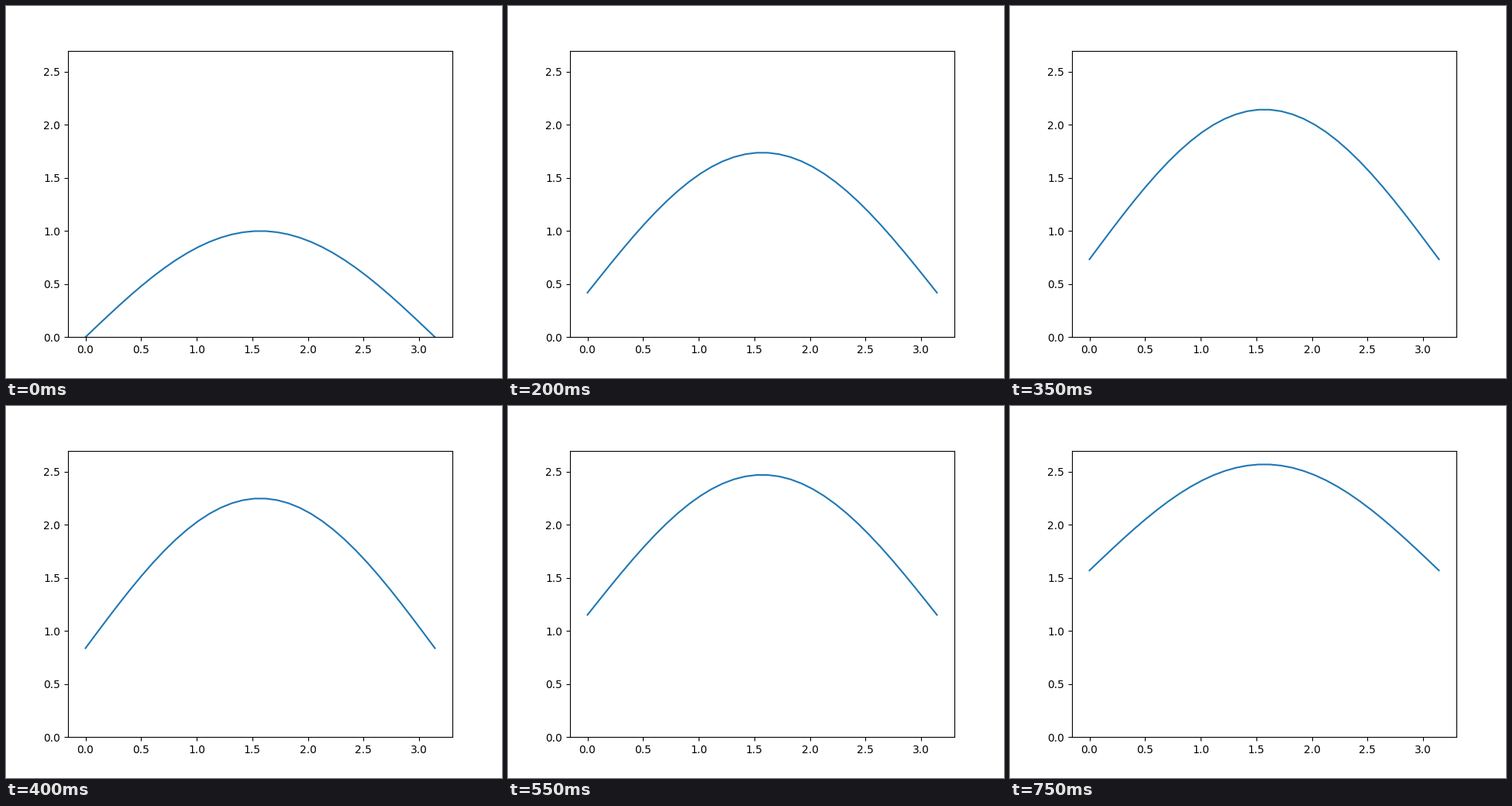
These frames come from a looping animation (640x480 px, 800 ms). A matplotlib script:

```python
import numpy as np
import matplotlib.pyplot as plt
from matplotlib.animation import FuncAnimation

FRAMES = 16
x = np.linspace(0, np.pi, 32)
times = np.linspace(0, np.pi / 2, FRAMES)


def wave(t):
    """Standing sine wave on a base that rises with t."""
    return np.sin(x) * (np.cos(t) + np.sin(t)) + t


fig, ax = plt.subplots(figsize=(6.4, 4.8), dpi=100)
line, = ax.plot(x, wave(0))
ax.set_ylim(0, 2.7)


def update(i):
    line.set_ydata(wave(times[i]))
    return line,


anim = FuncAnimation(fig, update, frames=FRAMES, interval=50,
                     repeat=True, repeat_delay=0)
plt.show()
```
